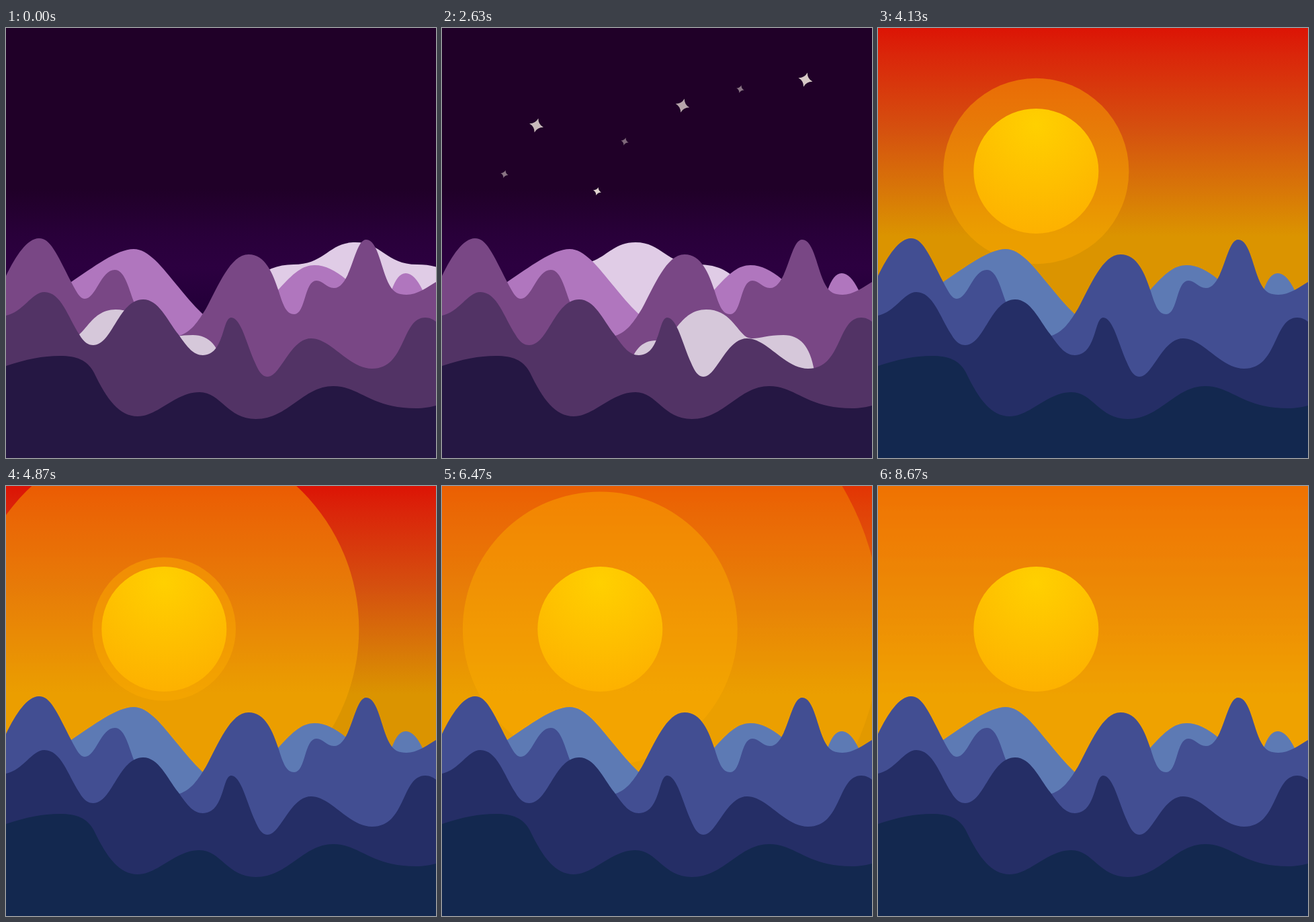
Animation, 640 px wide and 640 px high, one loop 9010 ms. Source, as an HTML page:

```html
<!DOCTYPE html>
<html lang="en">
<head>
<meta charset="utf-8">
<title>Sunrise over mountains</title>
<style>
  html, body { margin: 0; width: 100%; height: 100%; overflow: hidden; background: #200028; }
  svg { display: block; width: 100%; height: 100%; }
</style>
</head>
<body>
<svg id="scene" viewBox="0 0 640 640">
  <defs>
    <linearGradient id="sky" gradientUnits="userSpaceOnUse" x1="0" y1="0" x2="0" y2="430"></linearGradient>
    <radialGradient id="sunFill" cx=".5" cy=".13" r=".95">
      <stop offset="0" stop-color="#ffd000"/>
      <stop offset="1" stop-color="#fdae00"/>
    </radialGradient>
  </defs>
  <rect width="640" height="640" fill="url(#sky)"/>
  <g id="stars" fill="#fff5ea"></g>
  <g id="sunGroup">
    <g id="rings" fill="#faaa00"></g>
    <circle r="93" fill="url(#sunFill)"/>
  </g>
  <path id="backCloud" fill="#e0cce6" d="M-185,440 C-170,385 -140,352 -92,352 C-45,352 -40,319 0,319 C40,319 45,352 92,352 C135,352 160,370 185,440Z"/>
  <path class="ridge" d="M0,440 C60,405 97,378 97,378 C130,356 165,329 190,329 C222,329 250,385 292,425 C320,452 370,430 405,390 C428,364 442,353 459,353 C476,353 490,361 506,374 C525,390 560,410 574,390 C580,374 586,365 595,365 C604,365 612,374 620,390 L640,420 V640H0Z"/>
  <path class="ridge" d="M0,369 C15,338 32,313 49,313 C66,313 75,335 97,378 C105,393 110,403 117,403 C134,403 141,360 162,360 C176,360 182,385 190,407 C205,450 230,462 258,458 C275,453 286,437 298,417 C316,384 334,337 361,337 C386,337 397,365 406,392 C413,415 418,426 429,426 C446,426 444,376 462,376 C472,376 477,387 488,387 C514,387 518,315 536,315 C554,315 558,360 571,383 C577,394 585,397 596,397 C612,397 627,386 640,378 V640H0Z"/>
  <path id="frontCloud" fill="#d6c8da" d="M-120,525 C-112,485 -100,465 -74,465 C-45,465 -40,419 0,419 C35,419 45,450 60,460 C72,466 85,457 115,457 C143,457 158,478 163,525Z"/>
  <path class="ridge" d="M0,428 C25,423 39,393 57,393 C82,393 92,430 109,456 C116,468 122,472 130,472 C158,472 168,404 204,404 C228,404 240,436 258,458 C270,475 279,487 293,487 C325,487 322,431 335,431 C350,431 358,471 371,499 C377,513 382,519 389,519 C409,519 423,462 454,462 C484,462 510,507 545,507 C596,507 588,431 624,431 C631,431 636,434 640,437 V640H0Z"/>
  <path class="ridge" d="M0,503 C30,493 55,488 80,488 C108,488 122,496 131,513 C150,553 169,578 196,578 C226,578 252,542 288,542 C320,542 329,582 372,582 C420,582 442,533 487,533 C526,533 542,566 610,566 C622,566 632,564 640,562 V640H0Z"/>
</svg>
<script>
const LOOP = 9010, LAST_CHANGE = 8670;
const DAWN = 2850, DAWN_LENGTH = 1000;
const byId = id => document.getElementById(id);
const clamp = v => Math.min(1, Math.max(0, v));
const span = (t, from, to) => clamp((t - from) / (to - from));
const cubicInOut = x => x < .5 ? 4 * x ** 3 : 1 - 4 * (1 - x) ** 3;

const channels = hex => [1, 3, 5].map(i => parseInt(hex.slice(i, i + 2), 16));
function mix(a, b, k) {
  const to = channels(b);
  return '#' + channels(a).map((v, i) =>
    Math.round(v + (to[i] - v) * k).toString(16).padStart(2, '0')).join('');
}

function add(parent, name, attrs) {
  const node = document.createElementNS('http://www.w3.org/2000/svg', name);
  for (const key in attrs) node.setAttribute(key, attrs[key]);
  return parent.appendChild(node);
}

// Sky colours by height: y, night, first light, sunrise
const skyStops = [
  [0, '#200028', '#5a0030', '#dc1405'],
  [40, '#200028', '#70002a', '#da260a'],
  [150, '#200028', '#7e1844', '#d5500f'],
  [240, '#200028', '#8d2a55', '#d87608'],
  [310, '#29003a', '#98384b', '#db9400'],
  [355, '#2c0040', '#9c3c4a', '#db9400'],
  [430, '#220038', '#a03c48', '#db9400']
].map(([y, ...colors]) => ({ colors, node: add(byId('sky'), 'stop', { offset: y / 430 }) }));

// Night and day colour of each ridge, far to near
const ridgeColors = [
  ['#b076be', '#5d7ab4'], ['#794785', '#424e92'],
  ['#523365', '#252e66'], ['#251743', '#13284f']
];
const ridges = [...document.querySelectorAll('.ridge')];

// x, y, radius, twinkle speed in degrees per second
const stars = [
  [140.5, 145, 11.3, 47], [358, 115.5, 11.3, 88], [541, 77, 11.3, 91],
  [444, 91, 6.4, 84], [272, 169, 6.4, 83], [93, 217.5, 6.4, 84], [231, 243, 6.4, 92]
].map(([x, y, r, speed]) => ({
  x, y, r, speed,
  node: add(byId('stars'), 'path', { d: 'M0,-1Q.2,-.2 1,0Q.2,.2 0,1Q-.2,.2 -1,0Q-.2,-.2 0,-1Z' })
}));

const rings = [3550, 4550, 5550, 6550].map(start => ({ start, node: add(byId('rings'), 'circle', {}) }));

// Speeds up for 800 ms, then grows steadily
function ringRadius(age) {
  const ramp = 800, speed = .214;
  return 93 + speed * (age < ramp ? age * age / (2 * ramp) : age - ramp / 2);
}

function render(now) {
  const t = Math.min(now % LOOP, LAST_CHANGE);
  const dawn = cubicInOut(span(t, DAWN, DAWN + DAWN_LENGTH));

  const firstLight = span(t, DAWN, 3230), sunrise = span(t, 3230, 3790);
  for (const { colors: [night, early, day], node } of skyStops)
    node.setAttribute('stop-color', mix(mix(night, early, firstLight), day, sunrise));

  ridges.forEach((ridge, i) => ridge.setAttribute('fill', mix(...ridgeColors[i], dawn)));

  const starFade = 1 - span(t, 3240, 3540);
  for (const s of stars) {
    const glow = Math.sin(s.speed * t / 1000 * Math.PI / 180) ** 2;
    const size = s.r * (.87 + .13 * glow);
    s.node.setAttribute('transform',
      `translate(${s.x} ${s.y - 85 * dawn}) rotate(${t * .04}) scale(${size})`);
    s.node.setAttribute('opacity', Math.min(1, glow * 1.1) * starFade);
  }

  const cloudFade = 1 - span(t, 2840, 3130);
  for (const [id, x] of [['backCloud', 520 - .0882 * t], ['frontCloud', 163 + .0875 * t]]) {
    byId(id).setAttribute('transform', `translate(${x} 0)`);
    byId(id).setAttribute('opacity', cloudFade);
  }

  byId('sunGroup').setAttribute('transform', `translate(235.3 ${517 - 304 * dawn})`);
  for (const { start, node } of rings) {
    const age = Math.min(t - start, 2120);
    node.setAttribute('r', age > 0 ? ringRadius(age) : 0);
    node.setAttribute('opacity', .48 - .26 * span(age, 1750, 2120));
  }
}

const began = performance.now();
function tick() {
  render(performance.now() - began);
  requestAnimationFrame(tick);
}
tick();
</script>
</body>
</html>
```
